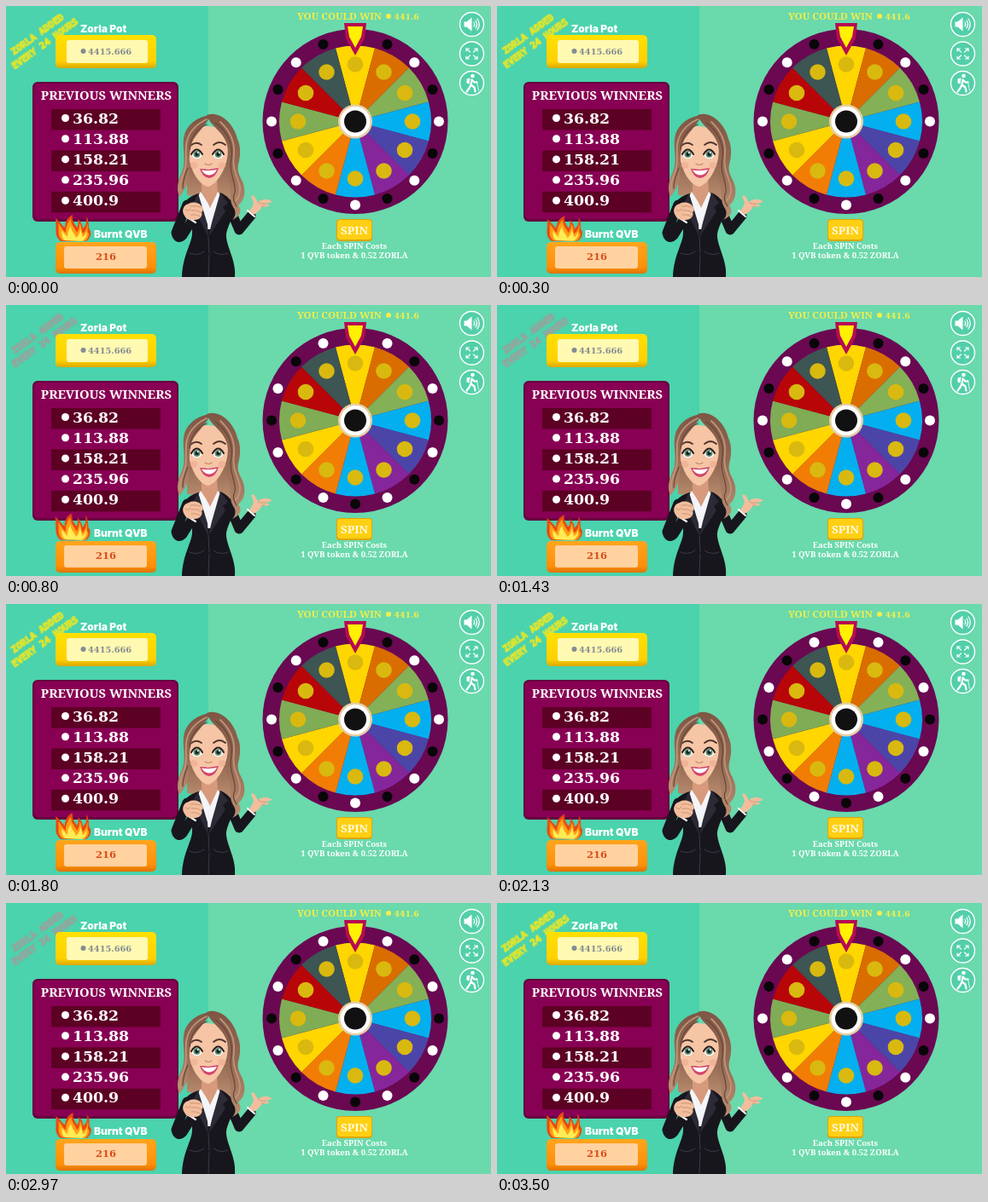
An HTML page that plays this animation: 568x318 px, repeating every 3530 ms.

```html
<!DOCTYPE html>
<html lang="en">
<head>
<meta charset="utf-8">
<title>Prize wheel</title>
<style>
  html, body { margin: 0; width: 100%; height: 100%; overflow: hidden; background: #4ad3ac; }
  svg { display: block; width: 100vw; height: 100vh; }
  text { font-family: "Noto Serif", Georgia, serif; font-weight: 700; }
  .num { font-family: "DejaVu Serif", serif; }
  .label { font: 900 12px Inter, sans-serif; fill: #fff; }
  .mid { text-anchor: middle; }
  .note text { font: 800 10.8px "DejaVu Sans Mono", monospace; text-anchor: middle; stroke-width: 1.1; }
  .note { transform-box: view-box; transform-origin: 42px 42px; }
  #flame { transform-box: fill-box; transform-origin: 50% 100%; }
  .line { fill: none; stroke-linecap: round; stroke-linejoin: round; }
</style>
</head>
<body>
<svg viewBox="0 0 568 318">
  <defs>
    <linearGradient id="gold" x2="0" y2="1">
      <stop stop-color="#ffe000"/><stop offset=".8" stop-color="#ffd000"/><stop offset="1" stop-color="#dba800"/>
    </linearGradient>
    <linearGradient id="amber" x2="0" y2="1">
      <stop stop-color="#ffa51c"/><stop offset=".8" stop-color="#ff8f0a"/><stop offset="1" stop-color="#dd7300"/>
    </linearGradient>
    <linearGradient id="hair" x2="0" y2="1">
      <stop stop-color="#7e5644"/><stop offset=".5" stop-color="#966b54"/><stop offset="1" stop-color="#bb8e70"/>
    </linearGradient>
  </defs>

  <path fill="#4ad3ac" d="M0 0h237v318H0z"/>
  <path fill="#6ad9ac" d="M237 0h331v318H237z"/>

  <g id="grey" class="note" fill="#86b3a3" stroke="#97a29c"></g>
  <g id="yellow" class="note" fill="#a4dc62" stroke="#ece722"></g>

  <!-- pot -->
  <text class="label" x="87" y="31">Zorla Pot</text>
  <rect x="58" y="34" width="118" height="39" rx="5" fill="url(#gold)"/>
  <rect x="71" y="40" width="95" height="27" rx="3" fill="#fff9b2"/>
  <circle cx="90.500" cy="53" r="3" fill="#858c92"/>
  <text class="num" x="96" y="56.500" font-size="9.800" fill="#858c92">4415.666</text>

  <!-- winners -->
  <rect x="31" y="89" width="171" height="164" rx="6" fill="#66033f"/>
  <rect x="33" y="91" width="167" height="159" rx="5" fill="#880054"/>
  <text class="mid" x="117.500" y="110" font-size="14.7" fill="#fff">PREVIOUS WINNERS</text>
  <g id="rows"></g>

  <!-- burnt -->
  <text class="label" x="103" y="272">Burnt QVB</text>
  <rect x="58" y="277" width="118" height="37" rx="5" fill="url(#amber)"/>
  <rect x="68" y="282" width="97" height="26" rx="3" fill="#ffd2a0"/>
  <text class="num mid" x="117" y="297.500" font-size="11.5" fill="#d64e1c">216</text>
  <g id="flame">
    <path fill="#e8480f" d="M64 276C55 268 60 262 58 249C63 253 66 258 69 260C69 253 72 248 78 245C77 252 80 255 83 260C85 257 85 253 84 250C88 253 90 258 90 261C94 258 95 253 94 247C99 254 95 260 99 264C100 270 97 274 94 276Z"/>
    <path fill="#ff9e14" d="M66 275C59 269 63 263 61 255C65 259 67 264 70 266C70 259 72 254 76 250C76 257 81 261 83 266C86 262 86 258 86 255C90 260 88 265 90 267C94 264 95 259 95 255C97 261 94 264 97 267C97 272 94 275 92 276Z"/>
    <path fill="#ffec55" d="M69 275C64 271 66 266 65 263C68 267 71 270 72 271C72 265 74 261 76 258C76 265 81 267 82 272C86 269 87 264 87 261C89 267 89 269 90 271C92 270 94 267 94 264C96 270 92 274 89 276Z"/>
  </g>

  <!-- presenter -->
  <g id="body">
    <path fill="url(#hair)" d="M212 150H266L264 228L212 222Z"/>
    <path fill="#d79a7c" d="M229 202H247L248 221L239 246L227 229L229 221Z"/>
    <path class="line" stroke="#17161d" stroke-width="11" d="M260 232L273 263L287 246"/>
    <path class="line" stroke="#fff" stroke-width="2.200" d="M283 240L291 247"/>
    <path fill="#f2be9d" d="M285 241C287 237 289 235 290 231L287 223C289 221 291 223 292 225L295 230C301 226 307 226 311 229C312 231 306 231 304 232L309 234C307 236 303 235 300 236C297 240 294 243 290 245Z"/>
    <path class="line" stroke="#c98f70" stroke-width=".8" d="M295 230L298 232L304 232M299 236L303 234"/>
    <path fill="#17161d" d="M226 220C218 222 211 226 208 234L211 246C215 253 219 259 218 267C218 278 207 292 206 318H268C270 300 259 284 258 271C257 263 264 253 267 241C266 229 260 223 251 219L239 252Z"/>
    <path fill="#f4f5f8" d="M228 218L223 226L235 262H241L254 225L248 218L239 235Z"/>
    <path fill="#d79a7c" d="M231 220L239 237L247 220Z"/>
    <path fill="#2b2a35" d="M225 220L218 233L224 237L222 241L237 271L236 256ZM251 219L260 231L254 236L257 241L237 271L241 254Z"/>
    <path class="line" stroke="#3c3b47" d="M237 271L238 290M215 290Q224 294 232 288M243 288Q251 294 260 290M238 292L237 318"/>
    <path class="line" stroke="#17161d" stroke-width="11" d="M212 233L199 266Q201 275 207 269L217 253"/>
    <path class="line" stroke="#f4f5f8" stroke-width="2.200" d="M211 247L222 254"/>
    <path fill="#f2be9d" d="M209 246C205 240 208 233 214 232C219 229 227 231 229 235C232 237 231 241 229 242C231 246 227 251 221 251C215 252 211 250 209 246Z"/>
    <path class="line" stroke="#c98f70" stroke-width=".9" d="M216 235Q223 234 228 236M217 240Q224 239 228 242M217 245Q223 244 227 247M210 239Q214 242 216 238"/>
  </g>
  <g id="head">
    <path fill="#f5c5a5" d="M213 168C212 150 222 141 236 141C252 141 261 152 260 169C260 188 248 209 237 212C225 210 214 190 213 168Z"/>
    <ellipse cx="220" cy="187" rx="4.500" ry="4" fill="#eda891" opacity=".6"/>
    <ellipse cx="253" cy="187" rx="4.500" ry="4" fill="#eda891" opacity=".6"/>
    <g id="eyes"></g>
    <path class="line" stroke="#51352b" stroke-width="1.800" d="M216 164Q222 158 229 163M243 163Q250 157 257 163"/>
    <path class="line" stroke="#c58b70" stroke-width="1.200" d="M233 185Q237 188 241 185"/>
    <path fill="#d2456c" d="M227 191Q233 191 237 192Q242 191 249 190Q246 201 238 202Q230 201 227 191Z"/>
    <path fill="#fff" d="M229 192.500Q238 194 247 192Q244 198 238 198.500Q232 198 229 192.500Z"/>
    <path fill="url(#hair)" d="M240 128C226 129 213 138 209 151C205 164 212 180 206 195C201 205 199 214 203 224C210 216 215 205 215 193C214 180 215 169 218 160C222 150 232 143 240 128Z"/>
    <path fill="url(#hair)" d="M235 128C240 142 254 146 259 163C262 180 256 190 260 203C265 214 260 226 266 236C270 241 269 247 265 251C276 246 276 239 272 234C279 228 281 219 278 209C275 200 270 196 272 186C275 176 275 164 271 156C267 138 250 122 235 128Z"/>
    <path class="line" stroke="#c0947a" stroke-width="1.800" d="M235 133C222 139 213 149 211 163C210 178 213 185 207 199Q203 207 204 217M251 136C264 148 268 160 267 174C264 192 272 201 274 213Q275 224 267 230"/>
    <path class="line" stroke="#674638" stroke-width="1.200" d="M235 139C222 145 216 154 215 168M213 190Q207 204 207 214M245 137C260 147 266 164 264 178C260 196 270 207 268 219Q264 226 270 235"/>
  </g>

  <!-- wheel -->
  <text x="341" y="16" font-size="11.5" fill="#f3ee48">YOU COULD WIN</text>
  <circle cx="448" cy="12" r="3" fill="#f3ee48"/>
  <text class="num" x="454.500" y="16" font-size="9.300" fill="#f3ee48">441.6</text>
  <g id="wheel" transform="translate(409 135.500)">
    <circle r="108.500" fill="#6a0852"/>
  </g>
  <path fill="#b60b51" d="M396 20H422L420 38L409 58L398 38Z"/>
  <path fill="#fff100" d="M400 24H418L416 36L409 49L402 36Z"/>

  <rect x="387" y="250" width="42" height="26" rx="4" fill="#dda60a"/>
  <rect x="388" y="251" width="40" height="23" rx="3.500" fill="#ffcf14"/>
  <text class="mid" x="408" y="267.500" font-size="13.300" fill="#fffbe0">SPIN</text>
  <g fill="#fff" font-size="9.500" class="mid">
    <text x="408" y="285">Each SPIN Costs</text>
    <text x="408" y="296">1 QVB token &amp; 0.52 ZORLA</text>
  </g>

  <!-- controls -->
  <g id="icons" fill="#52cfa9" stroke="#fff" stroke-width="1.400"></g>
  <g transform="translate(545.500 21.500)">
    <path fill="#fff" d="M-9 -3H-6L0 -8V8L-6 3H-9Z"/>
    <path class="line" stroke="#fff" stroke-width="1.200" d="M2.500 -2.500Q4 0 2.500 2.500M4.500 -4.500Q7.500 0 4.500 4.500M6.500 -6.500Q11 0 6.500 6.500"/>
  </g>
  <path class="line" transform="translate(545.500 56)" stroke="#fff" stroke-width="1.200" d="M-2 -2L-6.500 -6M-6.500 -3V-6H-3M2 -2L6.500 -6M3 -6H6.500V-3M-2 2L-6.500 6M-6.500 3V6H-3M2 2L6.500 6M3 6H6.500V3"/>
  <g transform="translate(545.500 90.500)">
    <circle cx="1" cy="-8.500" r="2.300" fill="#fff"/>
    <path fill="#fff" d="M-6 -5L-2 -6L-3 1L-6 0Z"/>
    <path class="line" stroke="#fff" stroke-width="2.200" d="M0 -4L-1 2L3 5L4 10M-1 2L-3 6L-6 10M0 -4L3 -1L6 -1"/>
    <path class="line" stroke="#fff" stroke-width=".8" d="M6 -2L8 9"/>
  </g>
</svg>
<script>
const CYCLE = 1765, HALF = CYCLE / 2;
const $ = id => document.getElementById(id);

function add(parent, tag, attrs, text) {
  const el = document.createElementNS("http://www.w3.org/2000/svg", tag);
  for (const k in attrs) el.setAttribute(k, attrs[k]);
  if (text) el.textContent = text;
  return parent.appendChild(el);
}

const polar = (deg, r) => {
  const a = deg * Math.PI / 180;
  return [r * Math.sin(a), -r * Math.cos(a)];
};

// steps: [time in ms, style]
function loop(el, steps, easing = "linear") {
  const frames = steps.map(([t, style]) => ({ offset: t / CYCLE, easing, ...style }));
  el.animate(frames, { duration: CYCLE, iterations: Infinity });
}

// hard switch between two styles, half a cycle each
const toggle = (el, at, a, b) =>
  loop(el, [[0, a], [at, b], [at + HALF, a], [CYCLE, a]], "steps(1, end)");

// corner note
for (const id of ["grey", "yellow"]) {
  const g = add($(id), "g", { transform: "rotate(-36 42 42)" });
  add(g, "text", { x: 43, y: 35.5 }, "ZORLA ADDED");
  add(g, "text", { x: 43.5, y: 49 }, "EVERY 24 HOURS");
}
const NOTE = 770;
toggle($("yellow"), NOTE, { opacity: 1 }, { opacity: 0 });
toggle($("grey"), NOTE, { opacity: 0 }, { opacity: 1 });
const size = s => ({ transform: `scale(${s})` });
loop($("yellow"), [
  [0, size(1.025)], [NOTE, size(.94)], [NOTE + HALF, size(1.04)], [CYCLE, size(1.025)]
]);

// winners
["36.82", "113.88", "158.21", "235.96", "400.9"].forEach((sum, i) => {
  const y = 121 + i * 24.2;
  if (i % 2 === 0) add($("rows"), "rect", { x: 53, y, width: 128, height: 24.5, fill: "#5c0024" });
  add($("rows"), "circle", { cx: 69.5, cy: y + 10.5, r: 4.5, fill: "#fff" });
  add($("rows"), "text", { class: "num", x: 78, y: y + 16.5, "font-size": 17.3, fill: "#fff" }, sum);
});

// eyes
for (const x of [223.5, 248.5]) {
  add($("eyes"), "ellipse", { cx: x, cy: 174, rx: 6, ry: 5.3, fill: "#fff" });
  add($("eyes"), "circle", { cx: x, cy: 174, r: 4, fill: "#5d9078" });
  add($("eyes"), "circle", { cx: x, cy: 174, r: 2.2, fill: "#172019" });
  add($("eyes"), "circle", { cx: x + 1.3, cy: 172.3, r: 1, fill: "#fff" });
  add($("eyes"), "path", {
    class: "line", stroke: "#2b1b18", "stroke-width": 2,
    d: `M${x - 6.5} 174Q${x} 163 ${x + 6.5} 174`
  });
}

// wheel
const wheel = $("wheel");
["#ffd600", "#da6d00", "#84b056", "#04afef", "#4c45a8", "#86269b",
 "#04afef", "#f27d05", "#ffd600", "#7fac54", "#b80508", "#3d5553"].forEach((fill, i) => {
  const a = i * 30;
  add(wheel, "path", { fill, d: `M0 0L${polar(a - 15, 89)}A89 89 0 0 1 ${polar(a + 15, 89)}Z` });
  const [cx, cy] = polar(a, 67);
  add(wheel, "circle", { cx, cy, r: 9.3, fill: "#d9b90f" });
});
add(wheel, "circle", { r: 20, fill: "#e5cfa5" });
add(wheel, "circle", { r: 17.5, fill: "#fff" });
add(wheel, "circle", { r: 13, fill: "#111" });

const lit = { fill: "#fff" }, dark = { fill: "#080608" };
for (let i = 0; i < 16; i++) {
  const [cx, cy] = polar(i * 22.5, 98);
  const bulb = add(wheel, "circle", { cx, cy, r: 6 });
  i % 2 ? toggle(bulb, 345, dark, lit) : toggle(bulb, 345, lit, dark);
}

for (const cy of [21.5, 56, 90.5]) add($("icons"), "circle", { cx: 545.5, cy, r: 14 });

// flicker
const lick = (sx, sy, k) => ({ transform: `skewX(${k}deg) scale(${sx}, ${sy})` });
loop($("flame"), [
  [0, lick(1, 1, 0)], [HALF / 2, lick(1.02, .95, -3)], [HALF, lick(.98, 1.02, 2)],
  [HALF * 1.5, lick(1.02, .96, -2)], [CYCLE, lick(1, 1, 0)]
], "ease-in-out");

// one shared clock, started at page load
const start = document.timeline.currentTime || 0;
document.getAnimations().forEach(a => { a.startTime = start; });
</script>
</body>
</html>
```
